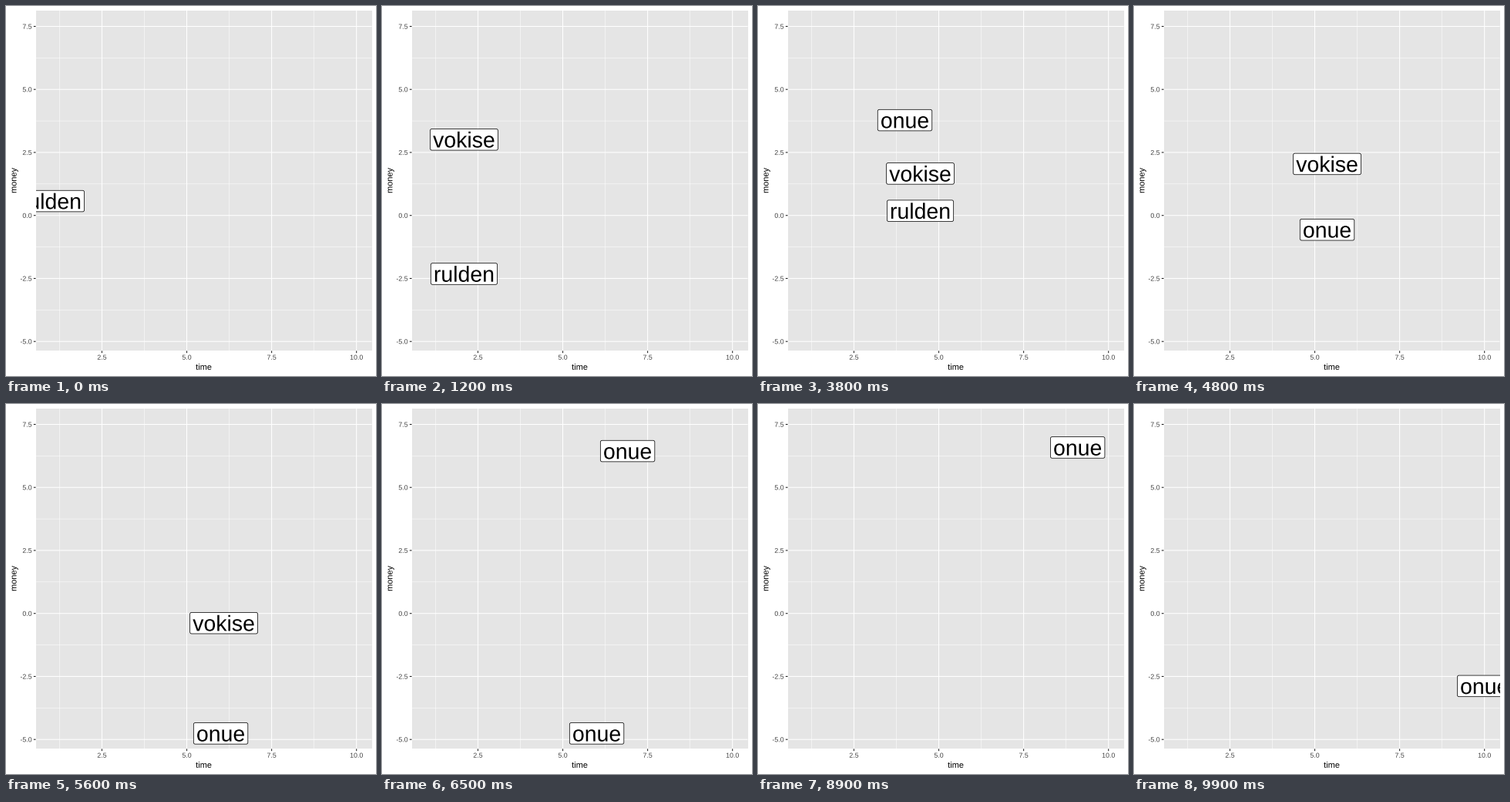
Recreate the animation shown at these times as a matplotlib script. Size 480x480 px, loop 10000 ms.

```python
import matplotlib.pyplot as plt
from matplotlib.animation import FuncAnimation
from matplotlib.patches import FancyBboxPatch, PathPatch, Rectangle
from matplotlib.textpath import TextPath
from matplotlib.transforms import Affine2D

SIZE, DPI = 480, 80
PT = 72 / DPI  # points per pixel
FONT = {"family": "Liberation Sans"}

# Panel edges in pixels, y pointing up
LEFT, RIGHT, BOTTOM, TOP = 38.6, 474.5, 32.6, 474.5
T0, T1 = 0.55, 10.45
M0, M1 = -5.373, 8.141

STEPS = 11  # frames between two whole times
FRAMES = 9 * STEPS + 1

# name, first time, money at each time from there on
PEOPLE = [
    ("rulden", 1, [0.57, -2.65, 1.01, -2.88]),
    ("vokise", 2, [3.07, 2.41, 1.52, 3.86, -1.14]),
    ("onue", 4, [3.78, 1.83, -4.76, 7.2, 2.16, 7.53, -2.88]),
]


def px(t):
    return LEFT + (t - T0) / (T1 - T0) * (RIGHT - LEFT)


def py(m):
    return BOTTOM + (m - M0) / (M1 - M0) * (TOP - BOTTOM)


def advance(s, size):
    ends = [TextPath((0, 0), u, size=size, prop=FONT).get_extents().x1
            for u in (s + "|", "|")]
    return ends[0] - ends[1]


def text(x, y, s, size, color="black", align=0.5, angle=0, z=4):
    """Draw s with its baseline through (x, y)."""
    path = TextPath((-align * advance(s, size), 0), s, size=size, prop=FONT)
    path = path.transformed(Affine2D().rotate_deg(angle).translate(x, y))
    return ax.add_patch(PathPatch(path, fc=color, lw=0, zorder=z))


def line(x, y, width, color, z):
    ax.plot(x, y, color=color, lw=width * PT, solid_capstyle="butt",
            snap=False, zorder=z)


fig = plt.figure(figsize=(SIZE / DPI, SIZE / DPI), dpi=DPI, facecolor="white")
ax = fig.add_axes([0, 0, 1, 1])
ax.set(xlim=(0, SIZE), ylim=(0, SIZE), autoscale_on=False)
ax.axis("off")

panel = ax.add_patch(Rectangle((LEFT, BOTTOM), RIGHT - LEFT, TOP - BOTTOM,
                               fc="#e5e5e5", lw=0, zorder=0))


def grid():
    for i in range(4):
        x = px(1.25 + 2.5 * i)
        line([x, x], [BOTTOM, TOP], 0.53, "white", 1)
    for i in range(5):
        y = py(-3.75 + 2.5 * i)
        line([LEFT, RIGHT], [y, y], 0.53, "white", 1)
    for i in range(4):
        v = 2.5 + 2.5 * i
        x = px(v)
        line([x, x], [BOTTOM, TOP], 1.07, "white", 2)
        line([x, x], [BOTTOM - 2.75, BOTTOM], 1.07, "#222222", 3)
        text(x, BOTTOM - 11.3, f"{v:.1f}", 8.8, "#444444")
    for i in range(6):
        v = -5 + 2.5 * i
        y = py(v)
        line([LEFT, RIGHT], [y, y], 1.07, "white", 2)
        line([LEFT - 2.75, LEFT], [y, y], 1.07, "#222222", 3)
        text(LEFT - 5, y - 3.15, f"{v:.1f}", 8.8, "#444444", align=1)
    text((LEFT + RIGHT) / 2, 8.1, "time", 11)
    text(13.5, (BOTTOM + TOP) / 2, "money", 11, angle=90)


def rows(t):
    return [(name, t, money[t - start]) for name, start, money in PEOPLE
            if 0 <= t - start < len(money)]


def state(frame):
    """Rows pair up by order; unpaired ones wait until the step ends."""
    step, k = divmod(frame, STEPS)
    now = rows(step + 1)
    if k == 0:
        return now
    f = k / STEPS
    after = rows(step + 2)
    out = []
    for i, (name, t, m) in enumerate(now):
        if i < len(after):
            name2, t2, m2 = after[i]
            name = name if f < 0.5 else name2
            t, m = t + (t2 - t) * f, m + (m2 - m) * f
        out.append((name, t, m))
    return out


FONT_PX, PAD, HEIGHT = 28.45, 3.6, 27.6
widths = {name: advance(name, FONT_PX) + 2 * PAD for name, _, _ in PEOPLE}
shown = []


def label(name, t, m, z):
    x, y, w = px(t), py(m), widths[name]
    box = FancyBboxPatch((x - w / 2, y - HEIGHT / 2), w, HEIGHT,
                         boxstyle="round,pad=0,rounding_size=2.16",
                         fc="white", ec="black", lw=0.75 * PT, zorder=z)
    parts = [ax.add_patch(box), text(x, y - 10.2, name, FONT_PX, z=z + 0.5)]
    for part in parts:
        part.set_clip_path(panel)
    return parts


def draw(frame):
    while shown:
        shown.pop().remove()
    for i, row in enumerate(state(frame)):
        shown.extend(label(*row, z=5 + i))
    return shown


grid()
anim = FuncAnimation(fig, draw, frames=FRAMES, interval=100, repeat=True,
                     blit=False)
plt.show()
```
